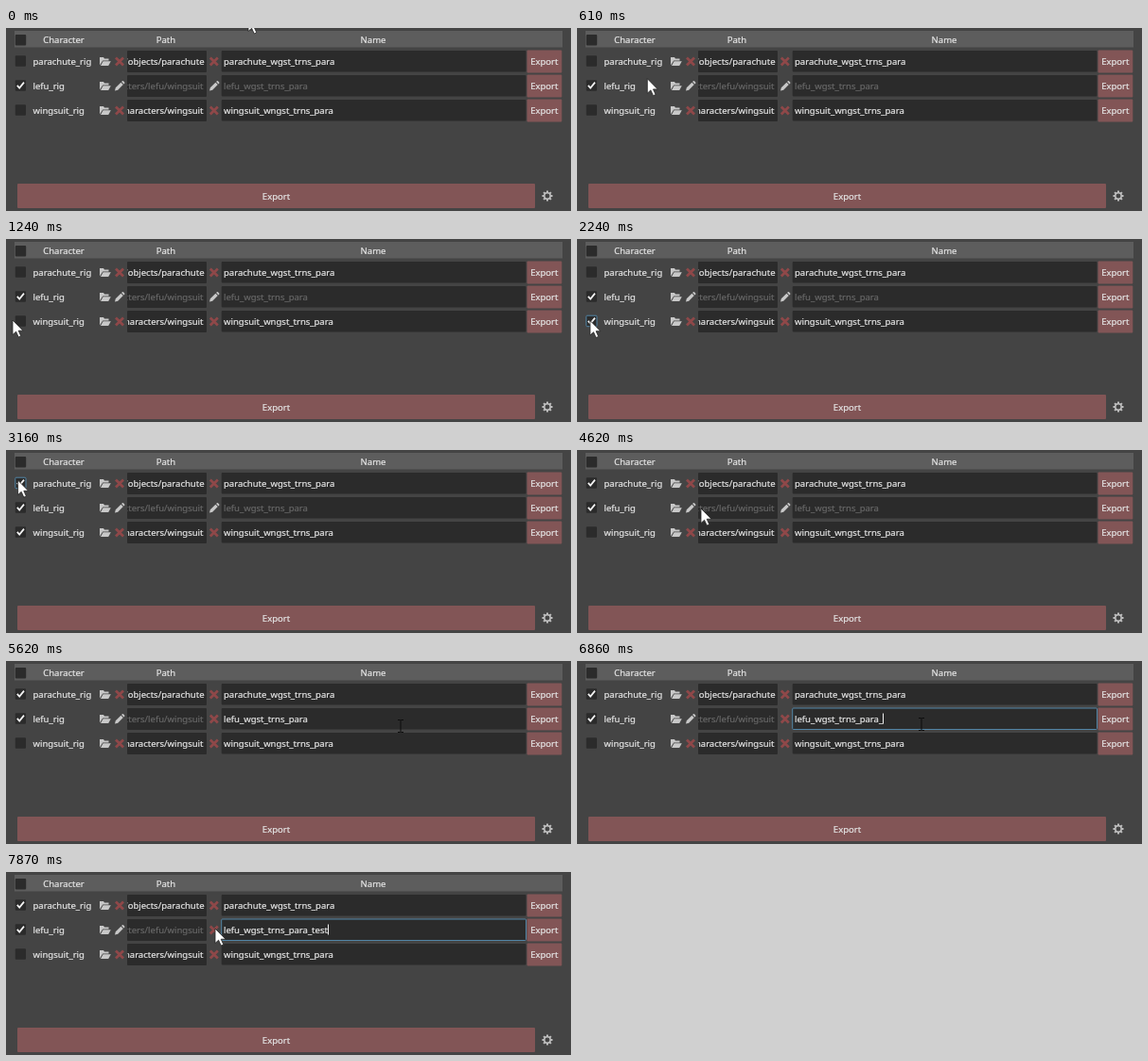
Write an HTML page that moves like this. It is 597 px wide and 194 px high and loops after 8000 ms.

```html
<!DOCTYPE html>
<html lang="en">
<head>
<meta charset="utf-8">
<title>Rig exporter</title>
<style>
html, body { margin: 0; width: 100%; height: 100%; overflow: hidden; background: #444; }
svg { display: block; }
text { font: 9.5px "Noto Sans", "Open Sans", sans-serif; fill: #e4e4e4; stroke: #e4e4e4; stroke-width: .22; white-space: pre; }
.mid { text-anchor: middle; }
.end { text-anchor: end; }
.dim { fill: #666; stroke: #666; }
.field { fill: #2b2b2b; }
.button { fill: #825556; }
.icon { fill: #c8c8c8; }
.cross { stroke: #8f4849; stroke-width: 2.7; fill: none; }
.tick { stroke: #f4f4f4; stroke-width: 1.7; fill: none; }
</style>
</head>
<body>
<svg id="stage" width="597" height="194" viewBox="0 0 597 194"></svg>
<script>
const LOOP = 8000;
const stage = document.getElementById('stage');

function add(tag, attrs, parent = stage, content = '') {
  const el = document.createElementNS('http://www.w3.org/2000/svg', tag);
  for (const key in attrs) el.setAttribute(key, attrs[key]);
  el.textContent = content;
  parent.appendChild(el);
  return el;
}
const rect = (x, y, width, height, attrs) => add('rect', { x, y, width, height, ...attrs });
const label = (x, y, content, cls = '', parent = stage) => add('text', { x, y, class: cls }, parent, content);
const show = (el, on) => el.setAttribute('visibility', on ? 'visible' : 'hidden');

function cross(x, y) {
  return add('path', { class: 'cross', d: `M${x - 4} ${y - 4}l8 8m0 -8l-8 8` });
}
function pencil(x, y) {
  return add('path', { class: 'icon',
    d: `M${x - 5} ${y + 5}l.8 -3.2l5.6 -5.6l2.4 2.4l-5.6 5.6zM${x + 2.1} ${y - 4.5}l.7 -.7q.6 -.5 1.2 0l1.2 1.2q.5 .6 0 1.2l-.7 .7z` });
}
function folder(x, y) {
  add('path', { class: 'icon', d: `M${x} ${y + 8.6}v-8.6h4l1 1.5h4.5v2h-6.3z` });
  add('path', { class: 'icon', d: `M${x + 1} ${y + 9.2}l2.6 -4.8h8.2l-2.6 4.8z` });
}
function checkbox(y) {
  const box = rect(9.8, y - 6, 11.2, 11.5, { class: 'field', rx: 1 });
  const tick = add('path', { class: 'tick', d: `M11.8 ${y - .3}l2.4 2.7l4.8 -6` });
  return { box, tick, y };
}

// Header
rect(9, 3, 579, 17.5, { fill: '#5d5d5d' });
rect(9.8, 7, 11.4, 11.5, { class: 'field', rx: 1 });
label(61, 16, 'Character', 'mid');
label(169, 16, 'Path', 'mid');
label(388, 16, 'Name', 'mid');

// Rows
const rows = [
  ['parachute_rig', '/objects/parachute', 'parachute_wgst_trns_para', 209.5],
  ['lefu_rig', 'characters/lefu/wingsuit', 'lefu_wgst_trns_para', 208.5],
  ['wingsuit_rig', 'characters/wingsuit', 'wingsuit_wngst_trns_para', 208.5]
].map(([rig, path, name, right], i) => {
  const y = 35.5 + 26 * i;
  const own = i !== 1;
  const check = checkbox(y - .3);
  label(28.5, y + 3.6, rig);
  folder(99, y - 4.6);
  (own ? cross : pencil)(120, y);
  const clip = add('clipPath', { id: 'clip' + i });
  add('rect', { x: 128.5, y: y - 12, width: 82.5, height: 24 }, clip);
  rect(128, y - 11.5, 84, 23, { class: 'field', rx: 1 });
  const g = add('g', { 'clip-path': `url(#clip${i})` });
  label(right, y + 3.6, path, own ? 'end' : 'end dim', g);
  const field = rect(227.7, y - 11.5, 321.8, 22.5, { class: 'field', rx: 1 });
  const nameText = label(230, y + 3.6, name);
  rect(550.5, y - 12, 36.8, 24, { class: 'button', rx: 1 });
  label(568.8, y + 3.6, 'Export', 'mid');
  return { check, field, nameText, name };
});
for (const i of [0, 2]) cross(219.8, 35.5 + 26 * i);
const nameCross = cross(219.8, 61.5);
const namePencil = pencil(220, 61.5);
const caret = rect(0, 55.5, 1, 11, { fill: '#f0f0f0' });

// Footer
rect(12, 165, 547, 26, { class: 'button', rx: 1 });
label(285.5, 182, 'Export', 'mid');
add('circle', { cx: 572, cy: 178, r: 3.2, fill: 'none', stroke: '#bebebe', 'stroke-width': 1.5 });
for (let a = 0; a < 360; a += 45)
  rect(571, 172.5, 2, 2.4, { fill: '#bebebe', transform: `rotate(${a} 572 178)` });

// Pointers
const arrow = add('path', { fill: '#fff', stroke: '#222', 'stroke-width': .8,
  d: 'M0 0V15.5L3.6 12.2L6.2 18L8.8 16.9L6.2 11.2H11Z' });
const beam = add('path', { fill: 'none', stroke: '#0c0c0c', 'stroke-width': 1,
  d: 'M-3 -6.5h2.5l.5 .5l.5 -.5h2.5M0 -6V6M-3 6.5h2.5l.5 -.5l.5 .5h2.5' });

// Pointer stops: time, x, y
const stops = [
  [0, 256, -12], [80, 250, -8], [850, 22, 72], [1240, 7, 86], [1470, 13, 87], [1900, 13, 88],
  [2150, 14, 90], [2750, 13, 33], [3240, 12.6, 32], [3750, 13, 91], [4050, 14, 91],
  [4420, 122, 64], [4620, 131, 62], [4850, 133, 62], [5160, 219, 62], [5320, 220, 62],
  [5620, 417, 69], [5900, 412, 69], [6300, 364, 67], [7400, 364, 67], [7800, 221, 60], [LOOP, 221, 60]
];
function pointer(t) {
  const i = stops.findIndex(s => s[0] > t);
  const [t0, x0, y0] = stops[i - 1], [t1, x1, y1] = stops[i];
  const u = (t - t0) / (t1 - t0), e = u * u * (3 - 2 * u);
  return [x0 + (x1 - x0) * e, y0 + (y1 - y0) * e];
}

const EDIT = 5250, FOCUS = 6350;
const keys = [6780, 6980, 7080, 7200, 7320];

function render(t) {
  const [x, y] = pointer(t);
  const ticked = [t >= 2850, true, t >= 1660 && t < 3900];
  rows.forEach(({ check }, i) => {
    show(check.tick, ticked[i]);
    const hover = x >= 9 && x <= 21 && Math.abs(y - check.y) < 7;
    check.box.setAttribute('stroke', hover ? '#5285a6' : 'none');
  });

  const row = rows[1], editable = t >= EDIT, focus = t >= FOCUS;
  show(namePencil, !editable);
  show(nameCross, editable);
  row.nameText.setAttribute('class', editable ? '' : 'dim');
  row.nameText.textContent = row.name + '_test'.slice(0, keys.filter(k => t >= k).length);
  row.field.setAttribute('stroke', focus ? '#5285a6' : 'none');
  show(caret, focus);
  if (focus) caret.setAttribute('x', Math.round(230 + row.nameText.getComputedTextLength()));

  const overText = editable && x > 228 && x < 549 && y > 50 && y < 73;
  show(arrow, !overText);
  show(beam, overText);
  (overText ? beam : arrow).setAttribute('transform', `translate(${x.toFixed(1)} ${y.toFixed(1)})`);
}

const start = performance.now();
function tick() {
  render((performance.now() - start) % LOOP);
  requestAnimationFrame(tick);
}
render(0);
tick();
</script>
</body>
</html>
```
